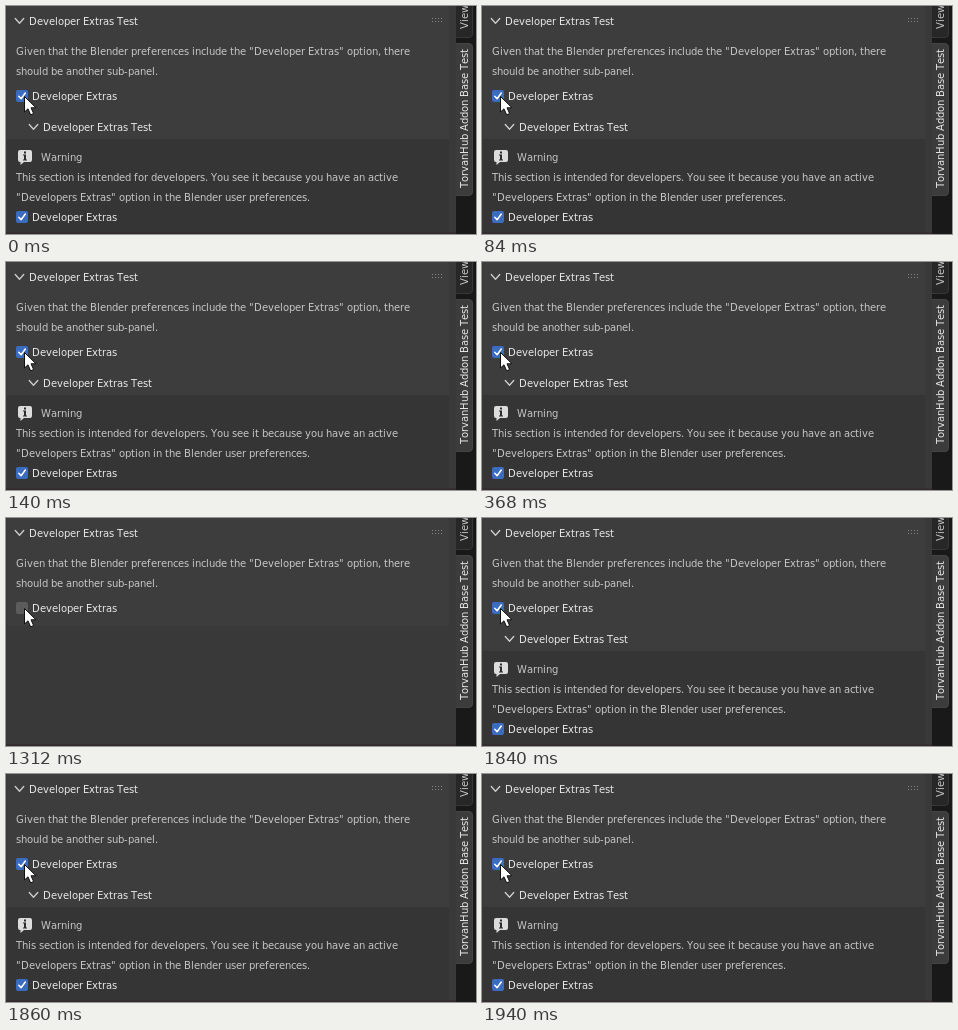
Animation of 470x228 px, one loop 2 s. Source, as an HTML page:

```html
<!DOCTYPE html>
<html lang="en">
<head>
<meta charset="utf-8">
<title>Sub-panel toggle</title>
<style>
  html, body { margin: 0; width: 100%; height: 100%; overflow: hidden; background: #393939; }
  svg { display: block; width: 470px; height: 228px; }
  text { font: 10px "DejaVu Sans", sans-serif; fill: #c6c6c6; white-space: pre; }
  .bright { fill: #e8e8e8; }
  .chevron { fill: none; stroke: #cfcfcf; stroke-width: 1.3; stroke-linecap: round; stroke-linejoin: round; }
</style>
</head>
<body>
<svg viewBox="0 0 470 228">
  <defs>
    <path id="chevron" class="chevron" d="M0 0L4.25 4.75L8.5 0"/>
    <g id="checked">
      <rect width="12" height="12" rx="2" fill="#3a6cbf"/>
      <path d="M2.8 6.3L5.1 8.8L9.3 3" fill="none" stroke="#fff" stroke-width="1.5" stroke-linecap="round" stroke-linejoin="round"/>
    </g>
  </defs>

  <rect width="470" height="228" fill="#393939"/>
  <path d="M1 0H443V105Q443 108 440 108H4Q1 108 1 105Z" fill="#3d3d3d"/>

  <g id="subpanel">
    <rect x="1" y="104" width="442" height="29" fill="#3d3d3d"/>
    <rect x="1" y="133" width="442" height="95" fill="#353535"/>
    <use href="#chevron" x="23.25" y="118.5"/>
    <path d="M14 144H24Q26 144 26 146V154Q26 156 24 156H18L14.5 159V156H14Q12 156 12 154V146Q12 144 14 144Z" fill="#dcdcdc"/>
    <path d="M18 145.5h2v2h-2zM17 148.5h3v5h1v1h-4v-1h1v-4h-1z" fill="#2c2c2c"/>
    <use href="#checked" x="10" y="205"/>
  </g>

  <rect y="226" width="450" height="2" fill="#342e30"/>

  <rect x="450" width="20" height="228" fill="#191919"/>
  <path d="M450 -1H466.5V28Q466.5 31.5 463 31.5H450" fill="#272727" stroke="#383838"/>
  <path d="M450 37.5H463Q466.5 37.5 466.5 41V186Q466.5 189.5 463 189.5H450" fill="#3c3c3c" stroke="#454545"/>

  <use href="#chevron" x="9.25" y="12.5"/>
  <g id="grip" fill="#858585"></g>

  <rect id="off" x="10" y="84" width="12" height="12" rx="2" fill="#5c5c5c"/>
  <use id="on" href="#checked" x="10" y="84"/>
  <g id="labels"></g>
  <path d="M18.5 90.5V106L22 102.8L24.6 108.8L27.6 107.5L25 101.8H30Z" fill="#fff" stroke="#111" stroke-linejoin="round"/>
</svg>

<script>
const NS = "http://www.w3.org/2000/svg";
const $ = id => document.getElementById(id);
const pen = document.createElement("canvas").getContext("2d");
pen.font = '10px "DejaVu Sans", sans-serif';

function add(parent, tag, attrs) {
  const el = document.createElementNS(NS, tag);
  for (const key in attrs) el.setAttribute(key, attrs[key]);
  return parent.appendChild(el);
}

// Set text with every glyph advance snapped to whole pixels.
function label(parent, x, y, str, cls = "", turn = 0) {
  let at = 0;
  const xs = [...str].map(ch => {
    const pos = at;
    at += Math.round(pen.measureText(ch).width);
    return pos;
  });
  const el = add(parent, "text", {
    x: xs.join(" "), y: 0, class: cls,
    transform: `translate(${x} ${y}) rotate(${turn})`
  });
  el.textContent = str;
}

const main = $("labels"), sub = $("subpanel");
label(main, 23, 19, "Developer Extras Test", "bright");
label(main, 10, 49, 'Given that the Blender preferences include the "Developer Extras" option, there');
label(main, 10, 69, "should be another sub-panel.");
label(main, 26, 94, "Developer Extras", "bright");
label(main, 462, 23, "View", "", -90);
label(main, 462, 182, "TorvanHub Addon Base Test", "bright", -90);

label(sub, 37, 125, "Developer Extras Test", "bright");
label(sub, 35, 155, "Warning");
label(sub, 10, 175, "This section is intended for developers. You see it because you have an active");
label(sub, 10, 195, '"Developers Extras" option in the Blender user preferences.');
label(sub, 26, 215, "Developer Extras", "bright");

for (let i = 0; i < 8; i++)
  add($("grip"), "rect", { x: 426 + (i % 4) * 3, y: 12 + (i >> 2) * 3, width: 1, height: 1 });

const LOOP = 2000, UNCHECK = 520, CHECK = 1840;
const show = (el, yes) => el.setAttribute("visibility", yes ? "visible" : "hidden");

function draw(ms) {
  const t = ms % LOOP;
  const open = t < UNCHECK || t >= CHECK;
  show(sub, open);
  show($("on"), open);
  show($("off"), !open);
}

const start = performance.now();
function tick() {
  draw(performance.now() - start);
  requestAnimationFrame(tick);
}
tick();
</script>
</body>
</html>
```
